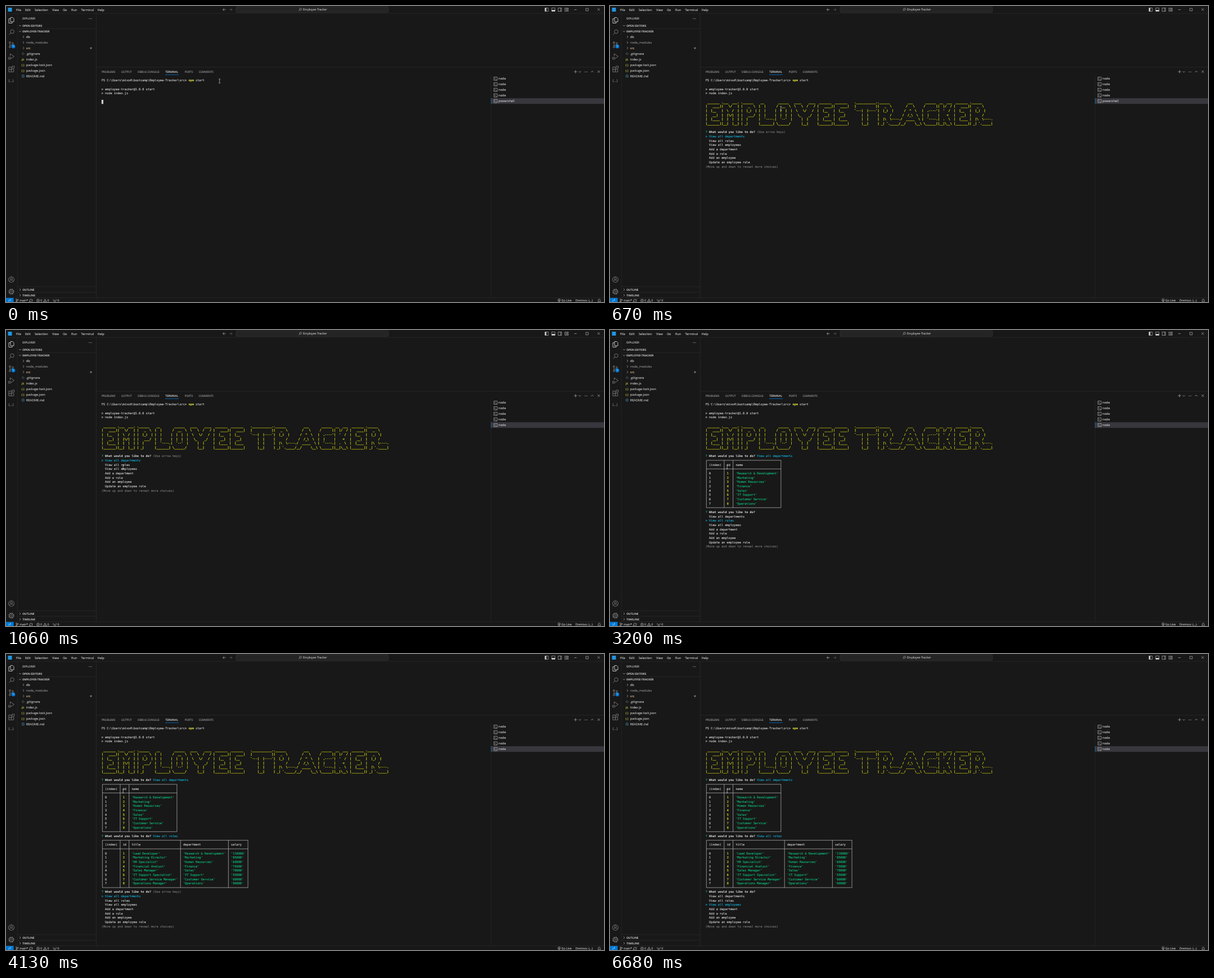
Recreate the animation shown at these times as an HTML page. Size 1063x527 px, loop 8000 ms.

```html
<!DOCTYPE html>
<html lang="en">
<head>
<meta charset="utf-8">
<title>Employee-Tracker</title>
<style>
html, body { margin: 0; width: 100%; height: 100%; overflow: hidden; background: #181818; }
svg { display: block; width: 100%; height: 100%; }
text { white-space: pre; text-rendering: geometricPrecision; }
.ui { font-family: "Open Sans", "Noto Sans", sans-serif; stroke-width: .1px; }
.mono { font-family: "DejaVu Sans Mono", "Noto Sans Mono", monospace; font-size: 5.241px; stroke-width: .14px; }
.art .mono { stroke-width: .26px; }
</style>
</head>
<body>
<svg id="stage" viewBox="0 0 1063 527" preserveAspectRatio="none"></svg>

<script type="text/plain" id="banner">
 _______ .___  ___. .______    __        ______   ____    ____  _______  _______    .___________..______          ___       ______  __  ___  _______ .______
|   ____||   \/   | |   _  \  |  |      /  __  \  \   \  /   / |   ____||   ____|   |           ||   _  \        /   \     /      ||  |/  / |   ____||   _  \
|  |__   |  \  /  | |  |_)  | |  |     |  |  |  |  \   \/   /  |  |__   |  |__      `---|  |----`|  |_)  |      /  ^  \   |  ,----'|  '  /  |  |__   |  |_)  |
|   __|  |  |\/|  | |   ___/  |  |     |  |  |  |   \_    _/   |   __|  |   __|         |  |     |      /      /  /_\  \  |  |     |    <   |   __|  |      /
|  |____ |  |  |  | |  |      |  `----.|  `--'  |     |  |     |  |____ |  |____        |  |     |  |\  \----./  _____  \ |  `----.|  .  \  |  |____ |  |\  \----.
|_______||__|  |__| | _|      |_______| \______/      |__|     |_______||_______|       |__|     | _| `._____/__/     \__\ \______||__|\__\ |_______|| _| `._____|
</script>

<script>
const LOOP = 8000;
const TEXT = '#cccccc', DIM = '#9d9d9d', GREY = '#767676', LINE = '#2b2b2b';
const BLUE = '#0078d4', YELLOW = '#e5e510', GREEN = '#0dbc79', CYAN = '#11a8cd';
const stage = document.getElementById('stage');

// ---- drawing helpers ----
const esc = s => String(s).replace(/&/g, '&amp;').replace(/</g, '&lt;');
const rect = (x, y, w, h, fill, extra = '') =>
  `<rect x="${x}" y="${y}" width="${w}" height="${h}" fill="${fill}" ${extra}/>`;
const stroke = (d, color = TEXT, width = 0.6) =>
  `<path d="${d}" fill="none" stroke="${color}" stroke-width="${width}"/>`;
const ring = (x, y, r, color = TEXT, width = 0.6) =>
  `<circle cx="${x}" cy="${y}" r="${r}" fill="none" stroke="${color}" stroke-width="${width}"/>`;
const dot = (x, y, r, color = TEXT) => `<circle cx="${x}" cy="${y}" r="${r}" fill="${color}"/>`;
// regular weights get a hairline outline, which keeps small text as strong as hinted text
const paint = (color, weight) =>
  `fill="${color}" font-weight="${weight}" stroke="${weight > 400 ? 'none' : color}"`;
const label = (x, y, s, size = 5.6, color = TEXT, weight = 400) =>
  `<text class="ui" x="${x}" y="${y + size * 0.36}" font-size="${size}" ${paint(color, weight)}>${esc(s)}</text>`;
const right = (x, y, color) => stroke(`M${x - 1} ${y - 2}l2 2l-2 2`, color);
const down = (x, y, color) => stroke(`M${x - 2} ${y - 1}l2 2l2 -2`, color);
const dots = (x, y) => [-2, 0, 2].map(dx => dot(x + dx, y, 0.5)).join('');
const cross = (x, y, r = 2) =>
  stroke(`M${x - r} ${y - r}l${2 * r} ${2 * r}m0 ${-2 * r}l${-2 * r} ${2 * r}`);
const lens = (x, y, r, color, width) =>
  ring(x + r * 0.3, y - r * 0.3, r, color, width) +
  stroke(`M${x - r * 0.4} ${y + r * 0.4}l${-r} ${r}`, color, width);
const during = (from, to, content) => `<g data-from="${from}" data-to="${to}">${content}</g>`;

// ---- terminal grid ----
const colX = col => 169.8 + col * 3.155;
const rowY = row => 132.4 + row * 7.663;
const put = (col, row, s, color = TEXT, weight = 400) =>
  `<text class="mono" x="${colX(col)}" y="${rowY(row) + 1.9}" ${paint(color, weight)}>${esc(s)}</text>`;

function table(top, edges, heads, rows) {
  const x = edges.map(c => colX(c + 0.5));
  const [y0, y1, y2] = [top, top + 2, top + 3 + rows.length].map(rowY);
  const frame = [y0, y1, y2].map(y => `M${x[0]} ${y}H${x[x.length - 1]}`).join('') +
    x.map(v => `M${v} ${y0}V${y2}`).join('');
  const colors = [TEXT, YELLOW];
  return stroke(frame, TEXT, 0.65) +
    heads.map((h, i) => put(edges[i] + 2, top + 1, h)).join('') +
    rows.map((cells, r) => [r, r + 1, ...cells.map(c => `'${c}'`)]
      .map((c, i) => put(edges[i] + 2, top + 3 + r, c, colors[i] || GREEN)).join('')).join('');
}

const choices = ['View all departments', 'View all roles', 'View all employees', 'Add a department',
  'Add a role', 'Add an employee', 'Update an employee role'];

const question = row => put(0, row, '?', GREEN) + put(2, row, 'What would you like to do?', '#e5e5e5', 700);
const answer = (row, s) => question(row) + put(29, row, s, CYAN);
const menu = (row, picked, hint) => question(row) +
  (hint ? put(29, row, '(Use arrow keys)', GREY) : '') +
  choices.map((s, i) => put(2, row + 1 + i, s, i === picked ? CYAN : TEXT)).join('') +
  put(0, row + 1 + picked, '>', CYAN) +
  put(0, row + 8, '(Move up and down to reveal more choices)', GREY);

const departments = ['Research & Development', 'Marketing', 'Human Resources', 'Finance', 'Sales',
  'IT Support', 'Customer Service', 'Operations'];
const titles = ['Lead Developer', 'Marketing Director', 'HR Specialist', 'Financial Analyst', 'Sales Manager',
  'IT Support Specialist', 'Customer Service Manager', 'Operations Manager'];
const salaries = [110, 85, 60, 75, 70, 55, 60, 90].map(k => k * 1000);

function terminal() {
  const art = document.getElementById('banner').textContent.split('\n').slice(1, 7);
  return put(0, 0, 'PS C:\\Users\\mivo4\\bootcamp\\Employee-Tracker\\src>') +
    put(49, 0, 'npm', '#f5f543', 700) + put(53, 0, 'start') +
    put(0, 2, '> employee-tracker@1.0.0 start') + put(0, 3, '> node index.js') +
    during(0, 240, rect(169.8, 167, 3.2, 7.4, TEXT)) +
    during(240, LOOP, `<g class="art">${art.map((s, i) => put(0, 5 + i, s, YELLOW)).join('')}</g>`) +
    during(240, 1960, menu(12, 0, true)) +
    during(1960, LOOP, answer(12, choices[0]) +
      table(13, [0, 10, 15, 42], ['(index)', 'id', 'name'], departments.map(d => [d]))) +
    during(1960, 3200, menu(25, 0, true)) +
    during(3200, 4130, menu(25, 1, false)) +
    during(4130, LOOP, answer(25, choices[1]) +
      table(26, [0, 10, 15, 44, 71, 82], ['(index)', 'id', 'title', 'department', 'salary'],
        titles.map((t, i) => [t, departments[i], salaries[i]]))) +
    during(4130, 6470, menu(38, 0, true)) +
    during(6470, 6680, menu(38, 1, false)) +
    during(6680, LOOP, menu(38, 2, false));
}

// ---- editor window ----
function titleBar() {
  const menus = [[18, 'File'], [34, 'Edit'], [51, 'Selection'], [82, 'View'], [101, 'Go'],
    [116, 'Run'], [133.5, 'Terminal'], [162.5, 'Help']];
  const pane = (x, fill) => stroke(`M${x - 3} 3.5h6v6h-6z`) + fill;
  return rect(3.5, 3, 7, 7, '#2196e3') +
    menus.map(([x, s]) => label(x, 6.5, s)).join('') +
    stroke('M390.5 6.5h-5m2.3 -2.4l-2.4 2.4l2.4 2.4') +
    stroke('M397 6.5h5m-2.3 -2.4l2.4 2.4l-2.4 2.4', '#6a6a6a') +
    rect(409, 1.2, 271, 10.2, '#242424', 'rx="2" stroke="#3c3c3c" stroke-width=".5"') +
    lens(523, 6.3, 1.8) + label(528, 6.5, 'Employee-Tracker', 5.15) +
    pane(961, rect(958, 3.5, 2.5, 6, TEXT)) + pane(973, rect(970, 7, 6, 2.5, TEXT)) +
    pane(984.5, stroke('M985.7 3.5v6')) +
    stroke('M993.5 3.7h2.4v5.6h-2.4zM997.2 3.7h2.3v2.1h-2.3zM997.2 7.2h2.3v2.1h-2.3z') +
    stroke('M1010 6.5h4.5') + stroke('M1030.7 4.2h4.4v4.4h-4.4z') + cross(1053.5, 6.3);
}

function activityBar() {
  const c = '#868686';
  return stroke('M8 20.5h4l2 2v5.5h-6zM8 22.7h-3v7.8h6v-2.3', '#e0e0e0', 0.8) +
    lens(10, 46.6, 3.3, c, 0.8) +
    ring(7, 65, 1.4, c, 0.8) + ring(12, 66.5, 1.4, c, 0.8) + ring(7, 73, 1.4, c, 0.8) +
    stroke('M7 66.4v5.2M12 68c0 2 -4 1 -5 3', c, 0.8) +
    dot(13, 72, 3.4, BLUE) + label(11.8, 72, '1', 4, '#fff', 600) +
    stroke('M7.5 89v-4l7 4.8l-5 3.6', c, 0.8) + ring(7, 93, 1.9, c, 0.8) +
    stroke('M4 91l1.5 1M4 95.3l1.5 -1M4 93.2h1', c, 0.6) +
    stroke('M5 108.7h4.4v8.6h-4.4zM5 113h8.8v4.3h-4.4M11 107h3.7v3.7h-3.7z', c, 0.8) +
    label(4.2, 133, '{…}', 6.4, c) +
    ring(9.5, 487, 5, c, 0.8) + ring(9.5, 485.7, 1.9, c, 0.8) + stroke('M6 490.5c1 -3.6 6 -3.6 7 0', c, 0.8) +
    ring(9.5, 508.5, 1.6, c, 0.8) + ring(9.5, 508.5, 3.7, c, 0.9) +
    `<circle cx="9.5" cy="508.5" r="4.6" fill="none" stroke="${c}" stroke-width="1.2" stroke-dasharray="1.8 1.813"/>`;
}

function sideBar() {
  const bold = (y, s) => label(29.2, y, s, 4.87, TEXT, 700);
  const files = [['db', TEXT], ['node_modules', '#8c8c8c'], ['src', '#e2c08d'], ['.gitignore', TEXT],
    ['index.js', TEXT], ['package-lock.json', TEXT], ['package.json', TEXT], ['README.md', TEXT]];
  const braces = y => label(27.6, y, '{ }', 5, '#cbcb41', 700);
  return label(29.2, 22.6, 'EXPLORER', 4.75) + dots(150, 22.5) +
    down(25, 35) + bold(35.2, 'OPEN EDITORS') + down(25, 45.2) + bold(45.4, 'EMPLOYEE-TRACKER') +
    files.map(([s, color], i) => label(35.8, 55.2 + i * 9.95, s, 5.6, color) +
      (i < 3 ? right(31, 55 + i * 9.95) : '')).join('') +
    dot(151, 75, 1.7, '#77705f') +
    stroke('M30.3 82.9l2.1 2.1l-2.1 2.1l-2.1 -2.1z', '#52656e', 0.9) +
    label(28, 95, 'JS', 4.6, '#cbcb41', 700) + braces(104.8) + braces(114.8) +
    ring(30.3, 124.8, 2.3, '#519aba') + stroke('M30.3 124.3v1.9M30.3 123.1v.7', '#519aba', 0.7) +
    right(25, 505) + bold(505.1, 'OUTLINE') + right(25, 515) + bold(515.1, 'TIMELINE');
}

function panel() {
  const tabs = [[170, 'PROBLEMS'], [205, 'OUTPUT'], [234, 'DEBUG CONSOLE'], [283.3, 'TERMINAL'],
    [317.7, 'PORTS'], [342.5, 'COMMENTS']];
  const shell = (y, s) => stroke(`M867.2 ${y - 2.9}h6v5.8h-6z`) +
    stroke(`M868.4 ${y - 1.5}l1.5 1.4l-1.5 1.4M870.4 ${y + 1.6}h1.8`) + s;
  const name = (y, s) => label(875.3, y, s);
  const ys = [0, 1, 2, 3].map(i => 129.4 + i * 9.95);
  return tabs.map(([x, s]) => label(x, 117.3, s, 4.72, s === 'TERMINAL' ? '#e7e7e7' : DIM)).join('') +
    rect(283, 121.8, 24, 0.8, BLUE) +
    stroke('M1009.7 117h5.4m-2.7 -2.7v5.4') + down(1020, 117.2) + dots(1031, 117.3) +
    stroke('M1040 118l2.2 -2.2l2.2 2.2') + cross(1053.6, 116.9) +
    rect(862, 164.2, 201, 10, '#37373d') + rect(862.2, 164.2, 0.6, 10, BLUE) +
    ys.map(y => shell(y, name(y, 'node'))).join('') +
    shell(169.2, during(0, 1060, name(169.2, 'powershell')) + during(1060, LOOP, name(169.2, 'node')));
}

function statusBar() {
  const y = 524.3, text = (x, s) => label(x, y, s, 5.1);
  return rect(0, 519.7, 13.6, 8, BLUE) + stroke('M4.3 523l2 1.7l-2 1.7M9 521.4l-2 1.7l2 1.7', '#fff') +
    ring(18.5, 522.4, 0.9) + ring(18.5, 526.2, 0.9) + ring(21.3, 523.2, 0.9) +
    stroke('M18.5 523.3v2M21.3 524.1c0 1 -2 .8 -2.8 1.4') + text(24.2, 'main*') +
    stroke('M41.8 524.5a2.4 2.4 0 0 1 4.6 -1m.6 -1.2v1.7h-1.7M46.9 524.7a2.4 2.4 0 0 1 -4.6 1m-.6 1.2v-1.7h1.7') +
    ring(57, y, 2.5) + cross(57, y, 1) + text(61.2, '0') +
    stroke('M69.3 521.8l2.8 4.8h-5.6zM69.3 523.4v1.7') + text(73.6, '0') +
    stroke('M84.4 522a2.4 2.4 0 0 0 0 3M89 522a2.4 2.4 0 0 1 0 3M86.7 523.5l-1.4 3.5M86.7 523.5l1.4 3.5') +
    text(91.6, '0') +
    dot(983.3, 523.6, 0.8) + ring(983.3, 523.6, 2.3) + stroke('M983.3 524v3') +
    label(987.3, y, 'Go Live', 5.3) + text(1012.3, 'Dremivo: {...}') +
    stroke('M1052 526h5l-.8 -1.3v-1.2a1.7 1.7 0 0 0 -3.4 0v1.2z');
}

const borders = stroke('M0 13.2H1063M20.2 13.2V519.5M160.5 13.2V519.5M160.5 108.8H1063M862 124V519.5' +
  'M0 519.5H1063M20.2 40.2H160.5M20.2 499.8H160.5M20.2 509.8H160.5', LINE, 0.7);
const pointer = '<g id="pointer">' +
  stroke('M-1.6 -3.6h1.1l.5 .5l.5 -.5h1.1M0 -3.1v6.4M-1.6 3.8h1.1l.5 -.5l.5 .5h1.1', '#d8d8d8', 0.7) + '</g>';

stage.innerHTML = rect(0, 0, 1063, 527, '#181818') + borders + titleBar() + activityBar() +
  sideBar() + panel() + statusBar() + terminal() + pointer;

// ---- animation ----
const timed = [...stage.querySelectorAll('[data-from]')];
const pointerNode = document.getElementById('pointer');
const smooth = u => u * u * (3 - 2 * u);

function update(t) {
  for (const g of timed) {
    g.style.display = t >= +g.dataset.from && t < +g.dataset.to ? '' : 'none';
  }
  // the pointer moves in 13 discrete steps
  const step = Math.min(13, Math.max(0, Math.floor((t - 490) / 32.5) + 1));
  const u = smooth(step / 13);
  pointerNode.setAttribute('transform', `translate(${379.6 - 171.4 * u} ${133.5 + 110.3 * u})`);
}

const start = performance.now();
function tick() {
  update((performance.now() - start) % LOOP);
  requestAnimationFrame(tick);
}
tick();
</script>
</body>
</html>
```
